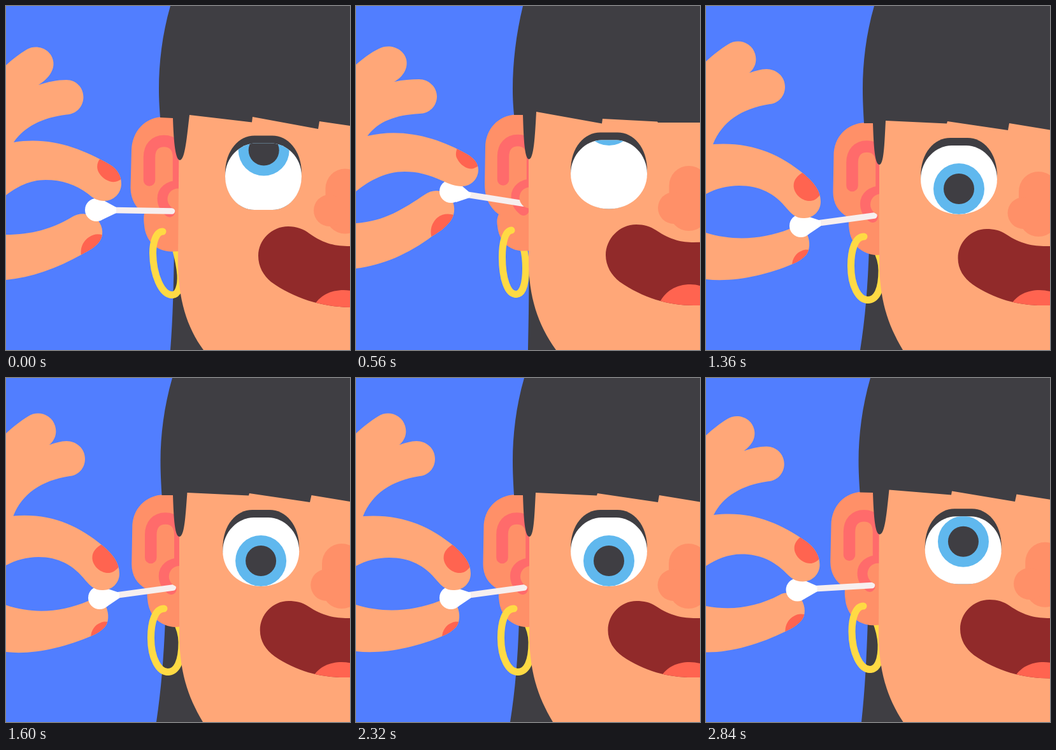
Recreate the animation shown at these times as an HTML page with a canvas. Size 540 by 540 pixels, loop 2880 ms.

```html
<!DOCTYPE html>
<html lang="en">
<head>
<meta charset="utf-8">
<title>Ear cleaning</title>
<style>
  html, body { margin: 0; width: 100%; height: 100%; overflow: hidden; background: #517eff; }
  canvas { display: block; width: 540px; height: 540px; }
</style>
</head>
<body>
<canvas id="stage"></canvas>
<script>
const SIZE = 540, STEP = 40, LOOP = 2880;
const SKIN = '#ffa778', HAIR = '#3f3e43', EAR = '#ff9068', PINK = '#ff6b6b',
      GOLD = '#ffda44', RED = '#ff6450';

const canvas = document.getElementById('stage');
const ctx = canvas.getContext('2d');
const ratio = window.devicePixelRatio || 1;
canvas.width = canvas.height = SIZE * ratio;

// Poses: 0 relaxed, 1 poking, 2 eyes rolled up, 3 eyes rising.
const linear = x => x;
const sine = x => (1 - Math.cos(Math.PI * x)) / 2;
const outQuart = x => 1 - (1 - x) ** 4;
const timeline = [ // step, pose, easing towards it
  [0, 3], [14, 2, outQuart], [22, 0, sine], [34, 1, sine],
  [46, 0, sine], [58, 1, sine], [70, 0, sine], [72, 3, linear]
];

// The first pose is a path of absolute x y pairs; others are a matching path or an [dx, dy] offset.
const NUMBER = /-?[\d.]+/g;
function shape(base, ...others) {
  const home = base.match(NUMBER).map(Number);
  const poses = [home, ...others.map(p =>
    typeof p === 'string' ? p.match(NUMBER).map(Number) : home.map((n, i) => n + p[i % 2]))];
  return (from, to, k) => {
    let i = 0;
    return new Path2D(base.replace(NUMBER, () => {
      const a = poses[from][i], b = poses[to][i++];
      return (a + (b - a) * k).toFixed(3);
    }));
  };
}
const dot = (x, y, ...others) => shape(`M${x} ${y} L${x + .01} ${y}`, ...others);

const shapes = {
  backHair: shape(
    'M244 380 C241 440 237 490 230 540 L330 540 L330 380 Z',
    'M256 380 C254 440 250 490 242 540 L330 540 L330 380 Z',
    'M271 380 C272 440 271 490 270 540 L330 540 L330 380 Z',
    'M264 380 C263 440 262 490 258 540 L330 540 L330 380 Z'),
  hoopBack: shape(
    'M254 461.5 C268 461.5 276 445 276 415 C276 402 273 392 266 380',
    [0, 0],
    'M251 452.5 C262 452.5 266.5 435 266.5 412 C266.5 400 266 392 263 380',
    'M261 453.5 C270 453.5 275 440 274 422 C273 408 270 395 266 380'),
  hoopFront: shape(
    'M248 362 C234 362 227.5 383 227.5 408 C227.5 440 240 461.5 254 461.5',
    [0, 0],
    'M244 352 C234 353 229.5 372 229.5 394 C229.5 428 238 452.5 251 452.5',
    'M246 354 C236 354 230.5 370 230.5 388 C231 422 244 453.5 261 453.5'),
  ear: shape(
    'M274 184 L246 183 C216 184 196 206 196 235 L195 292 C195 310 203 323 219 332 C220 337 219 341 220 348 C222 374 240 390 264 391 L274 390 Z',
    [4.5, 0],
    'M274 171 L252 170.5 C223 171 203 194 203 222 L202 280 C202 300 209 316 224 327 C221 334 221 338 222 345 C224 368 239 384 262 384.5 L274 384 Z',
    'M274 176 L248 174 C218 174 198 197 197 226 L195.5 285 C195.5 303 204 318 217 326 C216 332 216 336 217 344 C219 368 235 385 260 385.5 L274 385 Z'),
  earFold: shape(
    'M225 282 L225 246 C225 230 234 220.5 248 220.5 C262 220.5 271 230 271 246 L271 290',
    [4.5, 0], [6, -9.5], [0, -8.5]),
  earHollow: shape(
    'M272 290.5 C255 290.5 246 300 246 310.5 C246 320.5 250 326 257 331.5',
    [4.5, 0], [6, -11], [0, -8.5]),
  tragus: dot(270, 311.5, [4.5, 0], [3, -10.5], [0, -8.5]),
  face: shape(
    'M272 160 L272 400 C272 460 285 500 309 540 L540 540 L540 160 Z',
    [0, 0],
    'M271 160 L271 400 C271 455 285 500 314 540 L540 540 L540 160 Z',
    'M272 160 L270 400 C270 460 284 505 310 540 L540 540 L540 160 Z'),
  hair: shape(
    'M258 0 C245 45 239 90 239 130 C239 150 240 165 241 184 L262 184 C263 210 264 249 272 249 C281 249 283 220 287 180 L384 184.5 L385 181 L480 195 L483 184 L540 193.5 L540 0 Z',
    'M264 0 C251 45 246 90 246 130 C246 150 247 165 248 184 L262 184 C263 210 264 249 272 249 C279 249 280 220 282 180 L378 184.5 L379 181 L474 195 L476 184 L540 194.5 L540 0 Z',
    'M262 0 C251 45 246 90 246 130 C246 148 247 158 248 171 L262 171 C263 200 264 240.5 271.5 240.5 C279 240.5 281 205 283 166 L386 184.5 L387 177 L473 181.5 L474 183 L540 183 L540 0 Z',
    'M258 0 C245 45 240 90 240 130 C240 148 241 160 242 175 L262 176 C263 205 265 242 273 242 C281 242 284 205 288 171 L386 182.5 L387 174 L490 193 L492 181 L540 188 L540 0 Z'),
  lid: shape(
    'M343.5 267 C343.5 230 365 207 390 207 L417 207 C442 207 463.5 230 463.5 267 C463.5 300 437 327 404 327 L403 327 C370 327 343.5 300 343.5 267 Z',
    [-6.5, 0], [-6.5, -8.5],
    'M344 263 C344 226 366 203.5 390 203.5 L418 203.5 C442 203.5 464 226 464 263 C464 297 443 320 418 320 L390 320 C365 320 344 297 344 263 Z'),
  eye: shape(
    'M343.5 272 C343.5 241 368 219 392 219 L415 219 C439 219 463.5 241 463.5 272 C463.5 303 437 327 404 327 L403 327 C370 327 343.5 303 343.5 272 Z',
    [-6.5, 0], [-6.5, -8.5],
    'M344 267 C344 237 368 215.5 392 215.5 L416 215.5 C440 215.5 464 237 464 267 C464 297 443 320 418 320 L390 320 C365 320 344 297 344 267 Z'),
  iris: dot(403.2, 287, [-6.2, 0], [-6, -108], [1.5, -60.5]),
  nose: shape('M532 291 L532 331', [-10, 0], [-9.5, -9], [.5, -4.5]),
  nostril: dot(508, 325, [-9.5, 0], [-9, -8], [0, -4]),
  mouth: shape(
    'M447 350 C422 350 402 371 402 396 C402 413 411 427 425 437 C460 461 500 471 540 470 L560 470 L560 377 L540 377 C520 377 501 374 477 358 C468 352 458 350 447 350 Z',
    [-6.5, 0],
    'M440 343 C413 343 392 366 392 391 C392 408 401 423 414 433 C450 458 490 470 530 470 L560 470 L560 370 L530 371 C512 371 495 368 471 352 C462 346 452 343 440 343 Z',
    'M443 346 C417 346 396 367 396 392 C396 409 404 423 416 433 C452 459 495 472 540 473 L560 473 L560 377 L540 377 C518 377 500 374 476 357 C467 350 456 346 443 346 Z'),
  tongue: shape(
    'M480 480 C488 456 508 446 530 446 C552 446 572 456 580 480 Z',
    [-6.5, 0],
    'M471 480 C479 450 500 437 525 437 C547 437 565 449 573 480 Z',
    'M478 483 C486 457 506 446 530 446 C552 446 572 457 580 483 Z'),
  hand: shape(
    'M0 87 C12 76 22 68 35 60 C50 50 72 57 77 75 C81 88 76 98 68 105 C77 102 86 99 95 99 C110 99 124 110 124 127 C124 142 113 153 100 154 C55 161 25 182 12 216 C70 211 110 230 150 263 C165 275 176 290 176 307 C176 322 164 333 151 333 C138 334 131 327 123 318 C104 293 80 280 50 280 C33 280 15 285 0 293 Z',
    'M0 87 C12 76 22 68 35 60 C50 50 72 57 77 75 C81 88 76 98 68 105 C77 102 86 99 95 99 C110 99 124 110 124 127 C124 142 113 153 100 154 C55 161 25 182 11 217 C70 213 114 231 154 264 C169 277 180 290 180 307 C180 322 168 333 155 333 C142 334 135 327 127 318 C108 294 84 282 52 282 C33 282 15 287 0 295 Z',
    'M0 92 C12 82 23 73 36 67 C53 58 75 67 79 84 C82 98 74 111 60 119 C73 116 86 115 99 115 C114 115 127 127 127 142 C127 157 115 169 100 169 C62 171 35 181 18 204 C73 191 128 206 175 233 C185 239 192 247 192 257 C192 271 181 283 166 283 C155 283 146 279 137 275 C113 264 96 260 76 260 C48 260 22 273 0 291 Z',
    'M0 93 C11 83 21 75 33 68 C49 59 71 68 74 86 C77 100 67 114 51 124 C66 119 80 116 95 116 C110 116 121.5 128 121.5 143 C121.5 158 110 170 95 170.5 C57 175 28 190 12 214 C68 205 116 222 163 249 C175 256 181 267 181 279 C181 294 169 306 154 306 C144 306 137 302 129 295 C109 280 88 273 62 273 C37 273 17 284 0 297 Z'),
  indexNail: shape(
    'M150 260 C138 266 132 275 133.5 285 C136 299 150 307 160 306 C168 305 172 300 178 293 L182 265 Z',
    [4.3, 0],
    'M162 218 C157 225 155 234 159 240 C164 250 174 256 182 255.5 C186 255 189 253 195 249 L195 225 Z',
    'M149 238 C143 244 141 254 146 262 C152 272 163 277 171 276 C175 275.5 178 274 185 269 L185 245 Z'),
  thumb: shape(
    'M0 357 C40 372 85 370 127 350 C135 346 148 349 155 359 C160 370 160 384 153 391 C146 398 140 402 132 405 C90 423 40 436 0 431 Z',
    'M0 356 C42 369 88 367 131 350 C140 346 152 349 159 359 C164 370 163 384 157 391 C150 398 144 402 136 405 C94 423 42 434 0 429 Z',
    'M0 341 C45 338 75 318 108 296 C120 287 137 288 147 299 C156 310 157 326 148 338 C140 348 132 354 120 361 C83 389 42 407 0 412 Z',
    'M0 359 C40 359 72 350 104 331 C116 323 134 325 144 336 C153 347 154 362 145 372 C138 380 130 384 119 390 C80 412 40 426 0 430 Z'),
  thumbNail: shape(
    'M131 408 C131 396 138 387 147 384 C151 382 155 382 162 384 L162 408 Z',
    [4, 0],
    'M119 364 C115 352 119 340 128 332 C136 326 146 325 156 329 L160 364 Z',
    'M118 392 C116 380 121 369 130 363 C137 358 145 357 153 360 L158 392 Z'),
  stick: shape(
    'M172 341 L260.5 329', [3.5, 0], 'M174 296 L262 310', 'M170 320.5 L260.5 322'),
  cotton: dot(145, 345, [4, 0], [4, -54], [-3, -25]),
  cottonCone: shape(
    'M155 330 L176 337 L176 345.5 L156 359 L145 345 Z',
    [4, 0],
    'M160 277 L181 295 L178 301 L157 308 L149 291 Z',
    'M153 305 L173 316 L173 325 L152 335 L142 320 Z')
};

function currentPose(step) {
  const i = timeline.findIndex(key => key[0] > step);
  const [start, from] = timeline[i - 1], [end, to, ease] = timeline[i];
  return [from, to, ease((step - start) / (end - start))];
}

function draw(step) {
  const pose = currentPose(step);
  const path = name => shapes[name](...pose);
  const fill = (name, color) => { ctx.fillStyle = color; ctx.fill(path(name)); };
  const stroke = (name, color, width) => {
    ctx.strokeStyle = color;
    ctx.lineWidth = width;
    ctx.stroke(path(name));
  };
  const inside = (name, paint) => {
    ctx.save();
    ctx.clip(path(name));
    paint();
    ctx.restore();
  };

  ctx.setTransform(ratio, 0, 0, ratio, 0, 0);
  ctx.lineCap = 'round';
  ctx.fillStyle = '#517eff';
  ctx.fillRect(0, 0, SIZE, SIZE);

  fill('backHair', HAIR);
  stroke('hoopBack', GOLD, 11);
  fill('ear', EAR);
  stroke('earFold', PINK, 18.5);
  stroke('earHollow', PINK, 17);
  stroke('hoopFront', GOLD, 11);

  fill('thumb', SKIN);
  inside('thumb', () => fill('thumbNail', RED));
  stroke('stick', '#f7efef', 9.5);
  stroke('cotton', '#fff', 36);
  fill('cottonCone', '#fff');
  fill('hand', SKIN);
  inside('hand', () => fill('indexNail', RED));

  stroke('tragus', EAR, 33);
  fill('face', SKIN);
  fill('lid', HAIR);
  fill('eye', '#fff');
  inside('eye', () => {
    stroke('iris', '#60b8ee', 80);
    stroke('iris', HAIR, 48);
  });
  stroke('nose', EAR, 62);
  stroke('nostril', EAR, 50);
  fill('mouth', '#912a2a');
  inside('mouth', () => fill('tongue', RED));
  fill('hair', HAIR);
}

function tick() {
  draw(Math.floor(performance.now() % LOOP / STEP));
  requestAnimationFrame(tick);
}
tick();
</script>
</body>
</html>
```
